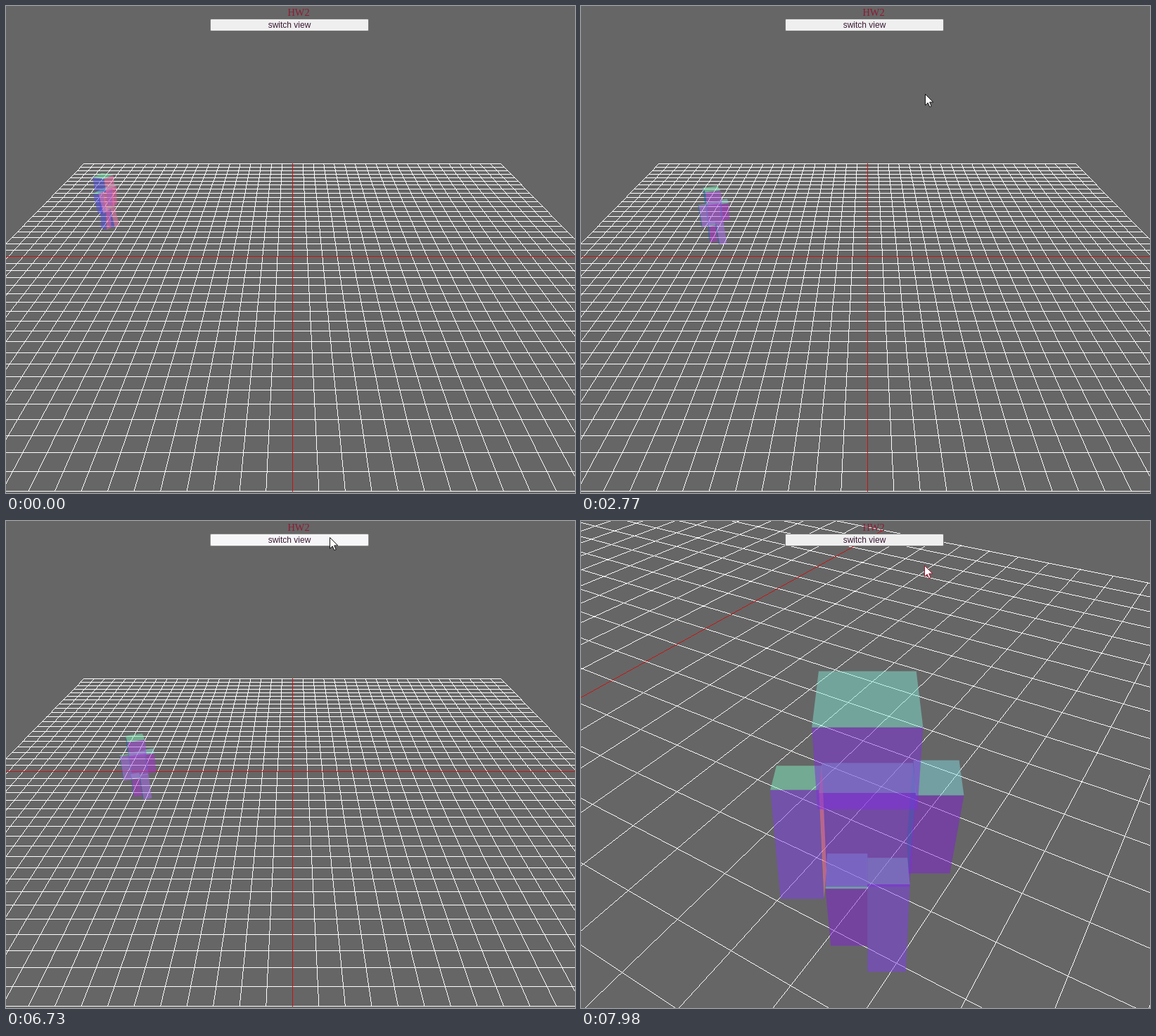
Write an HTML page with a canvas that moves like this. It is 809x693 px and loops after 8 s.

```html
<!DOCTYPE html>
<html lang="en">
<head>
<meta charset="utf-8">
<title>Walker</title>
<style>
  html, body { margin: 0; width: 100%; height: 100%; overflow: hidden; background: #666; }
  canvas, div, svg { position: absolute; }
  canvas { left: 0; top: 0; }
  #title {
    left: 316px; top: 0; width: 200px; text-align: center; color: #8c1c34;
    font: 14.4px/18px "Liberation Serif", "Times New Roman", serif;
  }
  #button {
    left: 290px; top: 18px; width: 226px; height: 18px; box-sizing: border-box;
    border: 1px solid #767676; border-radius: 2px; background: #efefef; color: #3a1a34;
    text-align: center; font: 12px/16px "Liberation Sans", Arial, sans-serif;
  }
  #button.hover { background: #e4e4e4; border-color: #4f4f4f; }
  #button.active { background: #f6f6f8; border-color: #8c8c8c; }
  #cursor { left: 0; top: 0; overflow: visible; }
</style>
</head>
<body>
<canvas id="stage" width="809" height="693"></canvas>
<div id="title">HW2</div>
<div id="button">switch view</div>
<svg id="cursor" width="13" height="20">
  <path d="M.5 .5V16.2L4.2 12.8L6.8 18.6L9.2 17.6L6.7 11.9H11.8Z" fill="#fff" stroke="#111"/>
</svg>
<script>
const W = 809, H = 693, LOOP = 8000;
const CX = 407.3, CY = 356.5, FOCAL = 878, NEAR = 0.3;
const SWITCH_AT = 6860, PRESS_AT = 6600;
const rad = d => d * Math.PI / 180;

const ctx = document.getElementById('stage').getContext('2d');
const button = document.getElementById('button');
const cursor = document.getElementById('cursor');
const arrow = cursor.firstElementChild;
const image = ctx.createImageData(W, H);
const pixels = new Uint32Array(image.data.buffer);
const GREY = 0xff666666, WHITE = 0xffffffff, RED = 0xff1212cc;

// Refresh times: first, last, count
const steps = [0];
for (const [a, b, n] of [
  [130, 250, 2], [440, 1200, 7], [1330, 1840, 5], [1900, 2020, 2], [2150, 2890, 7],
  [3020, 3780, 7], [3900, 4650, 7], [4770, 5020, 3], [5220, 5970, 7],
  [6100, 6860, 7], [6990, 7730, 7], [7850, 7980, 2]
]) for (let i = 0; i < n; i++) steps.push(Math.round((a + (b - a) * i / (n - 1)) / 10) * 10);

// Time, heading in degrees from +z towards +x
const turns = [[0, 67], [1840, 40], [3900, 3], [4900, 4], [7980, 31.5]];
// Time, x, z on the floor
const walk = [
  [0, -13.49, -4.93], [1840, -11.26, -3.52], [3900, -10.03, -0.45], [5020, -9.94, 1.22],
  [6730, -9.28, 3.5], [7500, -8.87, 4.42], [7980, -8.51, 5.06]
];
const pointer = [
  [2020, 752, 624], [2400, 610, 350], [2600, 530, 210], [2750, 487, 140], [2890, 504, 36],
  [3300, 478, 30], [3780, 459, 27], [4200, 459, 27], [4400, 460, 23], [7730, 460, 23], [7980, 488, 63]
];

function segment(table, t) {
  let i = 0;
  while (i < table.length - 2 && t >= table[i + 1][0]) i++;
  const a = table[i], b = table[i + 1];
  return [a, b, Math.min(1, Math.max(0, (t - a[0]) / (b[0] - a[0])))];
}

function lerp(table, t) {
  const [a, b, k] = segment(table, t);
  return a.slice(1).map((v, i) => v + (b[i + 1] - v) * k);
}

const heading = t => rad(lerp(turns, t)[0]);

function place(t) {
  const [a, b, k] = segment(walk, t);
  const reach = 1.48 * (b[0] - a[0]) / 1000;
  const ha = heading(a[0]), hb = heading(b[0]);
  const curve = (p, q, u, v) => {
    const k2 = k * k, k3 = k2 * k;
    return (2 * k3 - 3 * k2 + 1) * p + (3 * k2 - 2 * k3) * q
      + reach * ((k3 - 2 * k2 + k) * u + (k3 - k2) * v);
  };
  return [
    curve(a[1], b[1], Math.sin(ha), Math.sin(hb)),
    curve(a[2], b[2], Math.cos(ha), Math.cos(hb))
  ];
}

// Camera space: x right, y up, z depth
function makeCamera(px, py, pz, yaw, pitch) {
  const sy = Math.sin(yaw), cy = Math.cos(yaw), sp = Math.sin(pitch), cp = Math.cos(pitch);
  const turn = ([x, y, z]) => {
    const f = x * sy + z * cy;
    return [z * sy - x * cy, f * sp + y * cp, f * cp - y * sp];
  };
  return { turn, view: ([x, y, z]) => turn([x - px, y - py, z - pz]) };
}

const project = ([x, y, z]) => [CX + FOCAL * x / z, CY - FOCAL * y / z];

function drawLine(cam, p, q, color) {
  let a = cam.view(p), b = cam.view(q);
  if (a[2] < NEAR && b[2] < NEAR) return;
  if (a[2] > b[2]) [a, b] = [b, a];
  if (a[2] < NEAR) {
    const k = (NEAR - a[2]) / (b[2] - a[2]);
    a = a.map((v, i) => v + (b[i] - v) * k);
  }
  let s = project(a), e = project(b);
  const m = Math.abs(e[0] - s[0]) >= Math.abs(e[1] - s[1]) ? 0 : 1, n = 1 - m;
  if (s[m] > e[m]) [s, e] = [e, s];
  const size = [W, H], slope = (e[n] - s[n]) / (e[m] - s[m]);
  const from = Math.max(0, Math.floor(s[m])), to = Math.min(size[m] - 1, Math.floor(e[m]));
  for (let i = from; i <= to; i++) {
    const j = Math.floor(s[n] + slope * (i + 0.5 - s[m]));
    if (j >= 0 && j < size[n]) pixels[m ? i * W + j : j * W + i] = color;
  }
}

function drawGrid(cam) {
  pixels.fill(GREY);
  const pair = (i, color) => {
    drawLine(cam, [-20, 0, i], [20, 0, i], color);
    drawLine(cam, [i, 0, -20], [i, 0, 20], color);
  };
  for (let i = -20; i <= 20; i++) if (i) pair(i, WHITE);
  pair(0, RED);
  ctx.putImageData(image, 0, 0);
}

function drawRobot(cam, [x, z], yaw, swing) {
  const sy = Math.sin(yaw), cy = Math.cos(yaw);
  // side, width, top, length, depth, angle
  const parts = [
    [-0.25, 0.5, 1.48, 1.48, 0.5, swing], [0.25, 0.5, 1.48, 1.48, 0.5, -swing],
    [-0.75, 0.5, 2.955, 1.48, 0.5, -swing], [0.75, 0.5, 2.955, 1.48, 0.5, swing],
    [0, 1, 2.955, 1.475, 0.5, 0], [0, 1, 3.955, 1, 1, 0]
  ].map(([side, width, top, length, depth, angle]) => {
    const s = Math.sin(angle), c = Math.cos(angle);
    const dir = ([a, u, b]) => {
      const f = b * c - u * s;
      return [f * sy - a * cy, u * c + b * s, f * cy + a * sy];
    };
    const point = (i, j, k) => {
      const d = dir([i * width / 2, (j - 1) * length / 2, k * depth / 2]);
      return cam.view([x - side * cy + d[0], top + d[1], z + side * sy + d[2]]);
    };
    return { dir, point, far: point(0, 0, 0)[2] };
  });
  parts.sort((a, b) => b.far - a.far);
  for (const { dir, point } of parts) {
    for (let axis = 0; axis < 3; axis++) for (const sign of [-1, 1]) {
      const unit = [0, 0, 0];
      unit[axis] = sign;
      const n = cam.turn(dir(unit)), mid = point(...unit);
      if (n[0] * mid[0] + n[1] * mid[1] + n[2] * mid[2] >= 0) continue;
      const rgb = [n[0], n[1], -n[2]].map(v => Math.round(127.5 + 127.5 * v));
      ctx.fillStyle = `rgba(${rgb},0.5)`;
      ctx.beginPath();
      for (const [g, h] of [[-1, -1], [1, -1], [1, 1], [-1, 1]]) {
        const corner = [0, 0, 0];
        corner[axis] = sign;
        corner[(axis + 1) % 3] = g;
        corner[(axis + 2) % 3] = h;
        ctx.lineTo(...project(point(...corner)));
      }
      ctx.fill();
    }
  }
}

function drawPointer(t) {
  const shown = t >= pointer[0][0];
  const [x, y] = lerp(pointer, t).map(Math.round);
  const over = shown && x > 290 && x < 516 && y >= 18 && y < 36;
  const pressed = over && t >= PRESS_AT && t < SWITCH_AT;
  button.className = pressed ? 'active' : over ? 'hover' : '';
  cursor.style.display = shown ? 'block' : 'none';
  cursor.style.transform = `translate(${x}px, ${y}px)`;
  arrow.setAttribute('stroke', t > 7900 ? '#a0142c' : '#111');
}

const overview = makeCamera(0, 18.37, 36.99, Math.PI, rad(26.41));

function draw(t) {
  const yaw = heading(t), at = place(t);
  const swing = rad(18) * Math.sin(rad(158 + 0.36 * t));
  const cam = t < SWITCH_AT ? overview : makeCamera(
    at[0] - 5.05 * Math.sin(yaw), 7.155, at[1] - 5.05 * Math.cos(yaw), yaw, rad(39.2));
  drawGrid(cam);
  drawRobot(cam, at, yaw, swing);
  drawPointer(t);
}

let last = -1;
function tick() {
  const now = performance.now() % LOOP;
  let i = steps.length - 1;
  while (steps[i] > now) i--;
  if (i !== last) draw(steps[last = i]);
  requestAnimationFrame(tick);
}
tick();
</script>
</body>
</html>
```
